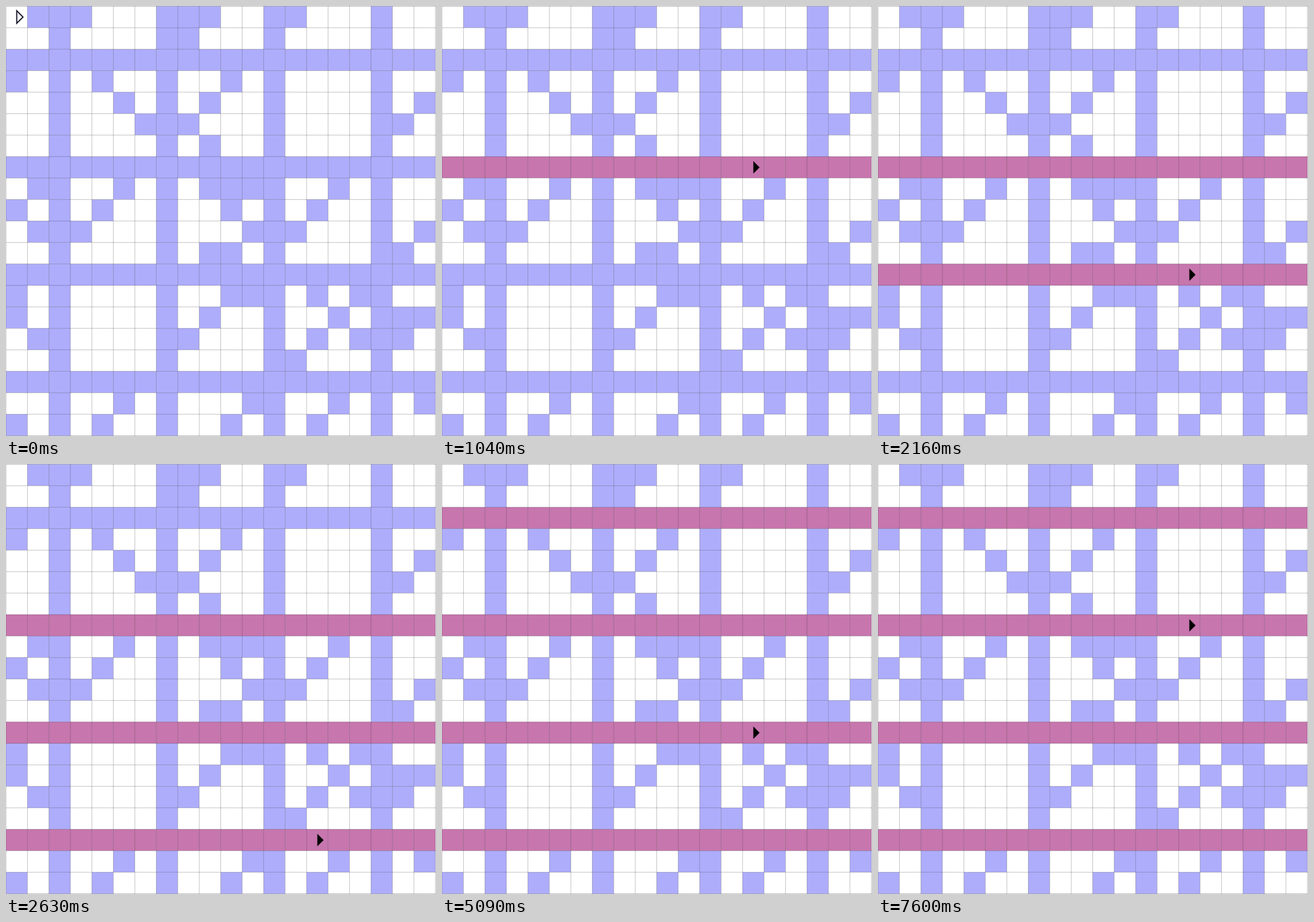
Write an HTML page with a canvas that moves like this. It is 748x748 px and loops after 8 s.

```html
<!DOCTYPE html>
<html>
<head>
<meta charset="utf-8">
<style>
html, body { margin: 0; height: 100%; overflow: hidden; background: #fff; }
canvas { display: block; }
</style>
</head>
<body>
<canvas id="stage" width="748" height="748"></canvas>
<script>
const ctx = document.getElementById('stage').getContext('2d');
const N = 20, SIZE = 37.35, TOP = 0.5, LOOP = 8000;
const PURPLE = '#aeadfc', PINK = '#c776ae';

// Cells crossed by lanes and diagonals; all paths wrap around the edges
const marked = Array.from({ length: N }, (_, row) =>
  Array.from({ length: N }, (_, col) =>
    row % 5 === 2 || col % 5 === 2 ||
    (row + col) % 10 === 3 || (col - row + N) % N === 1));

function walk(row, col, side, count) {
  for (let i = 0; i < count; i++) {
    marked[(row + i) % N][(col + side * i + N) % N] = true;
  }
}

walk(7, 2, -1, 16);
const stubs = [[6, 9], [7, 10], [7, 9], [11, 9], [12, 10], [11, 10],
  [10, 1], [13, 17], [14, 0], [19, 7]];
for (const [row, col] of stubs) walk(row, col, 1, 2);

// The opening beats are uneven, then a steady pulse snaps to 66 ms ticks
const opening = [520, 1040, 1700, 2160, 2630];
const beatTime = n => n <= 5 ? opening[n - 1] : 66 * Math.floor(7.5 * n + 2.5);

// Each lane takes two moves: jump in, then run round; every fifth beat makes both
function moveAt(t) {
  let n = 0;
  while (beatTime(n + 1) <= t) n++;
  return n - 1 + Math.floor(n / 5);
}

function cellColor(row, col, move) {
  for (let lane = 0; lane < 4; lane++) {
    const inLane = row === (7 + 5 * lane) % N;
    if (inLane && (move > 2 * lane || move === 2 * lane && col === 15)) return PINK;
  }
  return marked[row][col] ? PURPLE : '#fff';
}

function drawGrid() {
  ctx.strokeStyle = 'rgba(0,0,0,0.25)';
  ctx.lineWidth = 1;
  ctx.beginPath();
  for (let i = 0; i <= N; i++) {
    const p = i * SIZE;
    ctx.moveTo(p, 0);
    ctx.lineTo(p, 748);
    ctx.moveTo(0, p + TOP);
    ctx.lineTo(748, p + TOP);
  }
  ctx.stroke();
}

function drawCursor(row, col, hollow) {
  const x = (col + 0.5) * SIZE, y = (row + 0.5) * SIZE + TOP;
  ctx.beginPath();
  ctx.moveTo(x, y - 10.9);
  ctx.lineTo(x + 10.9, y);
  ctx.lineTo(x, y + 10.9);
  ctx.closePath();
  if (hollow) {
    ctx.strokeStyle = '#1c1b30';
    ctx.lineWidth = 2;
    ctx.stroke();
  } else {
    ctx.fillStyle = '#000';
    ctx.fill();
  }
}

function draw(t) {
  const move = moveAt(t);
  ctx.fillStyle = '#fff';
  ctx.fillRect(0, 0, 748, 748);
  for (let row = 0; row < N; row++) {
    for (let col = 0; col < N; col++) {
      ctx.fillStyle = cellColor(row, col, move);
      ctx.fillRect(col * SIZE, row * SIZE + TOP, SIZE, SIZE);
    }
  }
  drawGrid();
  if (move < 0) drawCursor(0, 0, true);
  else drawCursor((7 + 5 * Math.floor(move / 2)) % N, 15 - move % 2);
}

const begin = performance.now();
function tick() {
  draw((performance.now() - begin) % LOOP);
  requestAnimationFrame(tick);
}
tick();
</script>
</body>
</html>
```
